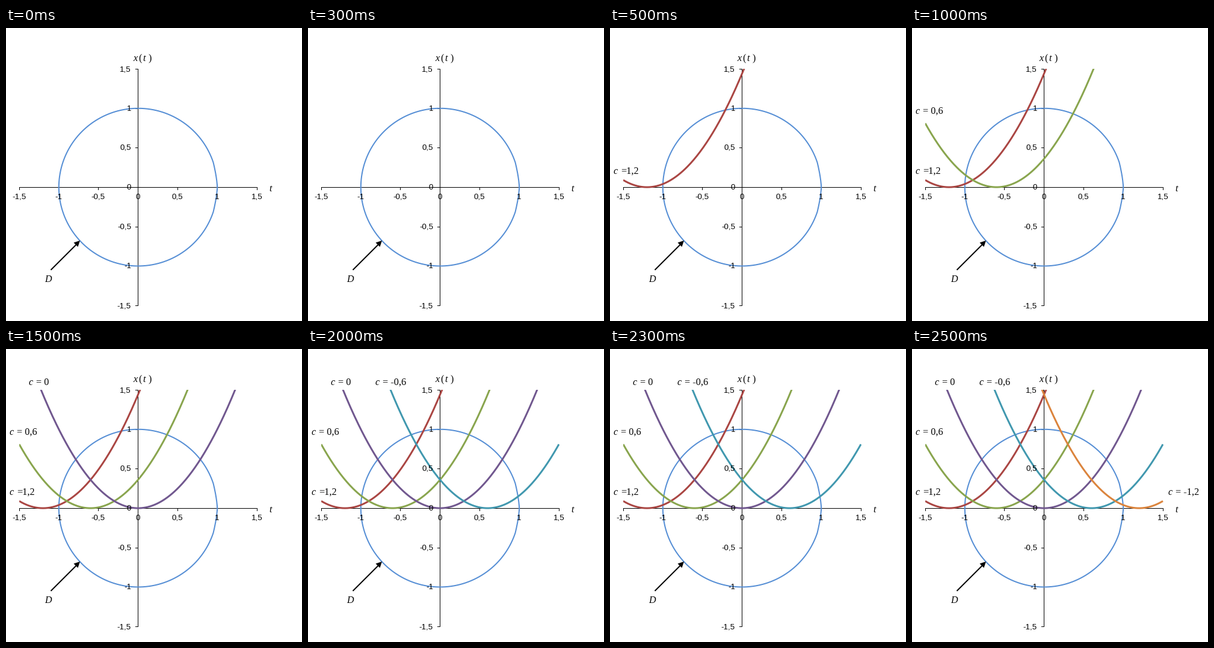
Write a matplotlib script that moves like this. It is 492x488 px and loops after 3 s.

```python
import numpy as np
import matplotlib.pyplot as plt
from matplotlib.animation import FuncAnimation
from matplotlib.patches import Polygon, Rectangle

W, H, DPI = 492, 488, 64
PT = 72 / DPI                       # points per pixel
X0, Y0 = 219.5, 265.5               # centre of the plot
UX, UY = 395 / 3, 394 / 3           # pixels per unit
LIFT = 0.4                          # curves sit slightly above the axis row

fig = plt.figure(figsize=(W / DPI, H / DPI), dpi=DPI, facecolor="white")
ax = fig.add_axes([0, 0, 1, 1])
ax.set_xlim(0, W)
ax.set_ylim(H, 0)
ax.axis("off")


def px(t):
    return X0 + UX * t


def py(x):
    return Y0 - UY * x


def mid(p):
    """Centre of the pixel that holds p."""
    return np.floor(p + 0.01) + 0.5


def line(xs, ys, color="black", width=1, z=2):
    return ax.plot(xs, ys, color=color, lw=width * PT, zorder=z,
                   solid_capstyle="butt", snap=False)[0]


def label(x, y, s, size=16, family="Liberation Serif", style="normal", ha="left"):
    return ax.text(x, y, s, fontsize=size * PT, family=family, style=style,
                   ha=ha, va="baseline", color="black", zorder=6)


def number(v):
    return f"{v:g}".replace(".", ",")


# axes with ticks and numbers
line([22, 418], [Y0, Y0])
line([X0, X0], [68, 463])
for v in np.arange(-3, 4) / 2:
    tx, ty = mid(px(v)), mid(py(v))
    line([tx, tx], [Y0, Y0 + 4.5])
    line([X0 - 4.5, X0], [ty, ty])
    label(tx - 0.5, 285, number(v), 13.33, "Liberation Sans", ha="center")
    label(208, ty + 3.5, number(v), 13.33, "Liberation Sans", ha="right")

# axis names
label(211, 55, "x", style="italic")
label(220, 55, "(")
label(227, 55, "t", style="italic")
label(236, 55, ")")
label(437, 272, "t", style="italic")

# unit circle, slightly flattened towards (1, 0)
edge = np.arccos(0.95)
a = np.linspace(edge, 2 * np.pi - edge, 300)
s = np.linspace(0, 1, 20)
tip_x, tip_y = 1 - 0.05 * s ** 1.5, np.sin(edge) * s
cx = np.concatenate([tip_x, np.cos(a), tip_x[::-1]])
cy = np.concatenate([tip_y, np.sin(a), -tip_y[::-1]])
line(px(cx), py(cy) - LIFT, "#558ED5", 2, 3)

# arrow to the circle
line([74.5, 117.5], [403, 360], width=2, z=5)
ax.add_patch(Polygon([(123, 354), (112.5, 357.5), (119.5, 364.5)],
                     color="black", lw=0, zorder=5))
label(64, 423, "D", style="italic")

# parabolas: c, colour, label text, label position
CURVES = [
    (1.2, "#AA4643", "=1,2", 6, 243),
    (0.6, "#89A54E", "= 0,6", 6, 143),
    (0.0, "#71588F", "= 0", 38, 60),
    (-0.6, "#4198AF", "= -0,6", 112, 60),
    (-1.2, "#DB843D", "= -1,2", 426, 243),
]
plot_area = Rectangle((22, 68), 396, 395, transform=ax.transData)
t = np.linspace(-1.5, 1.5, 301)
groups = []
for c, color, text, lx, ly in CURVES:
    curve = line(px(t), py((t + c) ** 2) - LIFT, color, 3, 4)
    curve.set_clip_path(plot_area)
    groups.append([curve, label(lx, ly, "c", style="italic"),
                   label(lx + 12, ly, text, 16.3)])


def draw(frame):
    for i, group in enumerate(groups):
        for artist in group:
            artist.set_visible(i < frame)
    return [artist for group in groups for artist in group]


anim = FuncAnimation(fig, draw, frames=6, interval=500, repeat=True)
plt.show()
```
